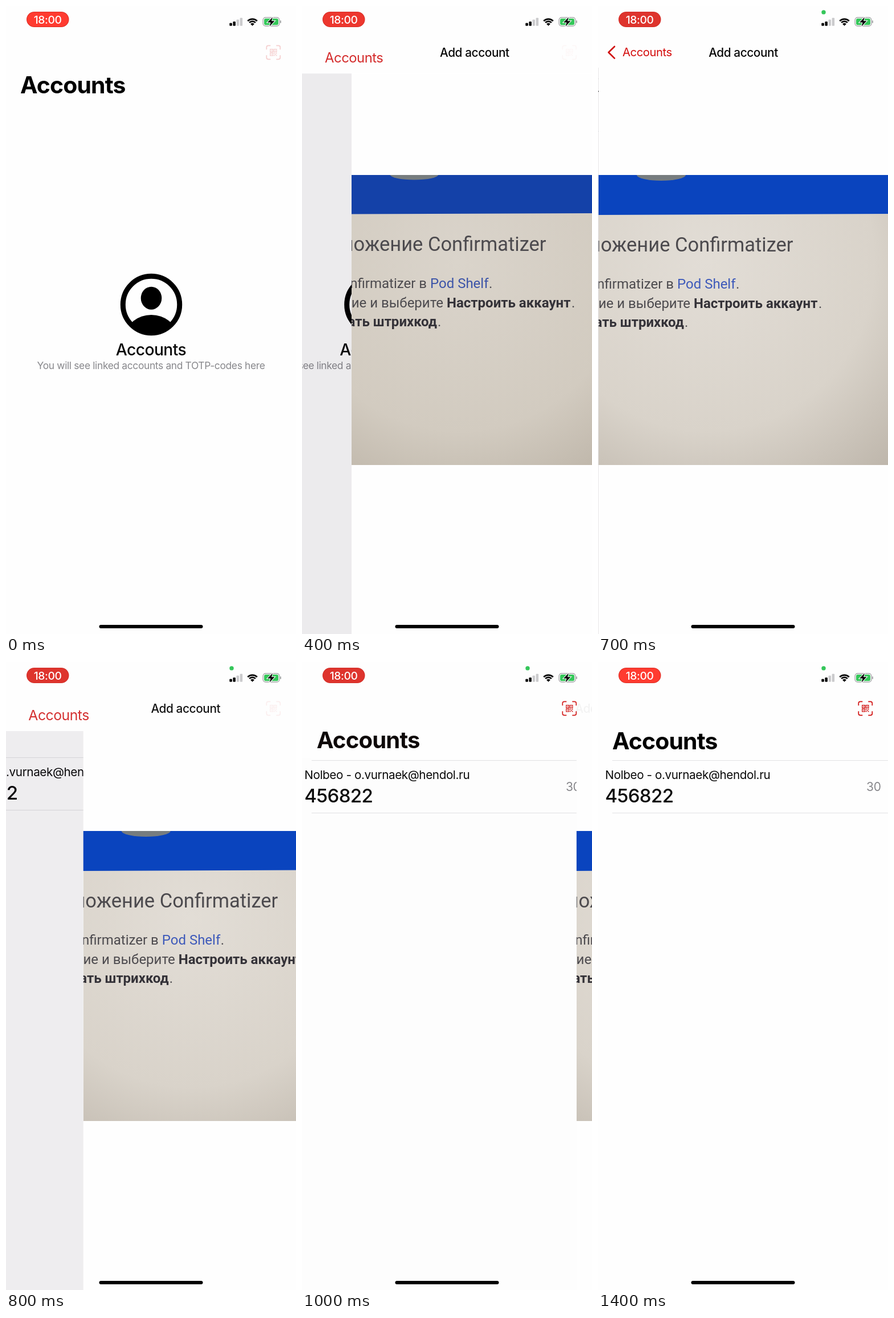
An HTML page with a canvas that plays this animation: 509 px wide and 1100 px high, repeating every 1590 ms.

```html
<!DOCTYPE html>
<html lang="en">
<head>
<meta charset="utf-8">
<title>Accounts</title>
<style>
html, body { margin: 0; height: 100%; overflow: hidden; background: #fefefe; }
canvas { display: block; }
</style>
</head>
<body>
<canvas id="stage" width="509" height="1100"></canvas>
<script>
const W = 509, H = 1100, LOOP = 1590, STEP = 100, LAST = 1400, POP = 700;
const BG = '#fefefe', RED = '#d0100f', GREY = '#88888c';
const UI = 'Inter, "Liberation Sans", sans-serif';
const PHOTO = 'Roboto, "Liberation Sans", sans-serif';
const c = document.getElementById('stage').getContext('2d');

const clamp = v => Math.max(0, Math.min(1, v));
const mix = (a, b, k) => a + (b - a) * k;
const rgb = (a, b, k) => `rgb(${a.map((v, i) => Math.round(mix(v, b[i], k)))})`;
// Critically damped spring from 0 to 1
const spring = a => a <= 0 ? 0 : 1 - (1 + a) * Math.exp(-a);

function ramp(t, keys) {
  const i = keys.findIndex(k => t <= k[0]);
  if (i < 0) return keys[keys.length - 1][1];
  if (!i) return keys[0][1];
  const [t0, a] = keys[i - 1], [t1, b] = keys[i];
  return mix(a, b, (t - t0) / (t1 - t0));
}

function box(x, y, w, h, color, r = 0) {
  c.fillStyle = color;
  c.beginPath();
  c.roundRect(x, y, w, h, r);
  c.fill();
}

function oval(x, y, rx, ry, color) {
  c.fillStyle = color;
  c.beginPath();
  c.ellipse(x, y, rx, ry, 0, 0, 2 * Math.PI);
  c.fill();
}

// y is the middle of the capitals
function text(s, x, y, size, weight, color, align = 'left') {
  c.font = `${weight} ${size}px ${UI}`;
  c.letterSpacing = -0.02 * size + 'px';
  c.textAlign = align;
  c.fillStyle = color;
  c.fillText(s, x, y + size * 0.364);
}

// y is the baseline
function print(s, x, y, size, weight, color, align = 'left') {
  c.font = `${weight} ${size}px ${PHOTO}`;
  c.letterSpacing = '0px';
  c.textAlign = align;
  c.fillStyle = color;
  c.fillText(s, x, y);
}

function emptyPage() {
  c.strokeStyle = '#000';
  c.lineWidth = 9;
  c.beginPath();
  c.arc(255, 523, 49.7, 0, 2 * Math.PI);
  c.stroke();
  oval(255, 511.7, 18.3, 20, '#000');
  c.save();
  c.beginPath();
  c.arc(255, 523, 52, 0, 2 * Math.PI);
  c.clip();
  oval(255, 577, 44, 36, '#000');
  c.restore();
  text('Accounts', 254.5, 602, 28.2, 550, '#0a0a0a', 'center');
  text('You will see linked accounts and TOTP-codes here', 254.5, 629.5, 17.4, 400, GREY, 'center');
}

function listPage(dy) {
  c.save();
  c.translate(0, dy);
  box(25, 172, 700, 1, '#e2e2e4');
  text('Nolbeo - o.vurnaek@hendol.ru', 12.5, 197.5, 20.7, 400, '#0a0a0a');
  text('456822', 12.5, 234, 33, 550, '#0a0a0a');
  text('30', 496.5, 218.5, 21, 400, GREY, 'right');
  box(25, 264, 700, 1, '#e2e2e4');
  c.restore();
}

// dark: 1 while the camera is still adjusting, 0 when settled
function cameraPage(edge, dark) {
  c.save();
  c.translate(edge, 0);
  box(0, 0, W, H, BG);
  c.beginPath();
  c.rect(0, 296, W, 508);
  c.clip();
  const paper = c.createRadialGradient(190, 450, 0, 190, 450, 490);
  paper.addColorStop(0, rgb([226, 221, 214], [207, 199, 186], dark));
  paper.addColorStop(0.6, rgb([217, 211, 202], [200, 191, 177], dark));
  paper.addColorStop(1, rgb([188, 180, 169], [176, 166, 150], dark));
  box(0, 296, W, 508, paper);
  c.translate(0, -3.5 * dark);
  c.filter = 'blur(0.7px)';
  c.fillStyle = rgb([10, 68, 190], [35, 61, 136], dark);
  c.beginPath();
  c.moveTo(-5, 285);
  c.lineTo(W + 5, 285);
  c.lineTo(W + 5, 364);
  c.lineTo(-5, 366);
  c.fill();
  oval(110, 296, 43, 10, '#777d7f');
  const ink = '#4c4a4e', bold = '#343238', link = rgb([62, 90, 186], [56, 74, 140], dark);
  print('Приложение ', 134, 430, 34.5, 400, ink, 'right');
  print('Confirmatizer', 134, 430, 34.5, 400, ink);
  print('Confirmatizer в ', 138, 495, 24, 400, ink, 'right');
  print('Pod Shelf', 138, 495, 24, 400, link);
  print('.', 241, 495, 24, 400, ink);
  print('приложение и выберите ', 167, 529, 24, 400, ink, 'right');
  print('Настроить аккаунт', 167, 529, 24, 700, bold);
  print('.', 386, 529, 24, 400, ink);
  print('Сканировать штрихкод', 150, 562, 24, 700, bold, 'right');
  print('.', 151, 562, 24, 400, ink);
  c.restore();
}

function scanIcon(alpha) {
  c.save();
  c.globalAlpha = alpha;
  c.translate(469.3, 81.3);
  c.strokeStyle = RED;
  c.lineWidth = 1.7;
  for (let i = 0; i < 4; i++) {
    c.beginPath();
    c.moveTo(-12, -5);
    c.lineTo(-12, -9);
    c.quadraticCurveTo(-12, -12, -9, -12);
    c.lineTo(-5, -12);
    c.stroke();
    c.rotate(Math.PI / 2);
  }
  c.lineWidth = 1.2;
  for (const [x, y] of [[-5.6, -5.6], [0.9, -5.6], [-5.6, 0.9]]) {
    c.strokeRect(x, y, 4.7, 4.7);
    box(x + 1.6, y + 1.6, 1.5, 1.5, RED);
  }
  for (const [x, y] of [[0.5, 0.5], [4.3, 0.5], [2.4, 2.4], [0.5, 4.3], [4.3, 4.3]]) box(x, y, 1.8, 1.8, RED);
  c.restore();
}

// q: 0 = large title, 1 = back button
function navBar(q, popping) {
  box(0, 0, W, mix(172, 108, q), BG);
  scanIcon(popping ? (1 - q) ** 1.7 : 0.2 * (1 - q));

  c.globalAlpha = clamp(q * 1.2);
  if (q > 0) text('Add account', mix(551, 255, q), 81, 20.8, 550, '#0a0a0a', 'center');

  const x = mix(117, 17, q), y = mix(138, 81, q);
  c.globalAlpha = clamp((q - 0.85) / 0.15);
  c.strokeStyle = RED;
  c.lineWidth = 2.7;
  c.lineCap = c.lineJoin = 'round';
  c.beginPath();
  c.moveTo(x + 12, y - 10);
  c.lineTo(x + 1.5, y + 0.3);
  c.lineTo(x + 12, y + 10.6);
  c.stroke();
  c.lineCap = 'butt';
  c.lineJoin = 'miter';
  c.globalAlpha = 1;

  const width = mix(184, 87, q), heavy = q < 0.55;
  const tone = 240 * q * (1 - q) + 12 * q;
  text('Accounts', mix(25, 43, q), y, heavy ? width / 4.5 : width / 4.31,
    heavy ? 700 : 400, `rgb(${212 * clamp(q * 1.75)},${tone},${tone})`);
}

function statusBar(t) {
  const pulse = ramp(t, [[200, 0], [300, 0.3], [500, 0.8], [700, 1], [1000, 1], [1400, 0]]);
  box(36, 10, 74.5, 27, rgb([222, 45, 36], [212, 46, 40], pulse), 13.5);
  box(37, 11, 72.5, 25, rgb([255, 59, 48], [222, 52, 45], pulse), 12.5);
  text('18:00', 73.2, 23.7, 19.3, 500, '#fff', 'center');

  const live = t > 500, dot = live ? 3.7 : 2.6;
  if (t >= 500) oval(396, 10.9, dot, dot, live ? '#34c65a' : '#72d68c');
  [5, 7.5, 11, 14].forEach((h, i) => box(392.3 + i * 6.1, 34.7 - h, 4.5, h, i < 2 ? '#000' : '#cbcbcd', 1));

  c.strokeStyle = '#000';
  c.lineWidth = 2.7;
  for (const r of [11.7, 7.6]) {
    c.beginPath();
    c.arc(432.5, 34.5, r, -Math.PI * 0.75, -Math.PI * 0.25);
    c.stroke();
  }
  c.fillStyle = '#000';
  c.beginPath();
  c.moveTo(432.5, 34.8);
  c.arc(432.5, 34.8, 4.7, -Math.PI * 0.75, -Math.PI * 0.25);
  c.fill();

  c.strokeStyle = '#98989b';
  c.lineWidth = 1.2;
  c.beginPath();
  c.roundRect(451.1, 20.1, 28.8, 15, 4.5);
  c.stroke();
  box(453, 22, 25, 11.2, '#34c759', 2.8);
  box(481.2, 25.3, 1.6, 4.8, '#98989b', 1);
  const bolt = new Path2D('M468 19.5 L459 28.8 H464.5 L462.5 35.8 L471.5 26.3 H466 Z');
  c.strokeStyle = '#fff';
  c.lineWidth = 2;
  c.stroke(bolt);
  c.fillStyle = '#000';
  c.fill(bolt);
}

function draw(t) {
  const popping = t >= POP;
  const edge = popping ? Math.max(1, W * spring((t - 745) * 0.0183))
                       : W * (1 - spring((t - 225) * 0.0183));
  const q = popping ? 1 - spring((t - 761) * 0.0214) : spring((t - 247) * 0.0214);

  box(0, 0, W, H, BG);
  c.save();
  c.translate(-0.3 * (W - edge), 0);
  if (popping) listPage(-64 * (1 - spring((t - 665) * 0.031)));
  else emptyPage();
  c.restore();
  box(0, 0, W, H, `rgba(20,0,30,${0.09 * (1 - edge / W)})`);

  if (edge < W) cameraPage(edge, ramp(t, [[300, 1], [400, 0.4], [500, 0]]));
  navBar(q, popping);
  statusBar(t);
  box(163.5, 1084, 182, 6, '#000', 3);
}

function tick() {
  const t = performance.now() % LOOP;
  draw(Math.min(LAST, Math.floor(t / STEP) * STEP));
  requestAnimationFrame(tick);
}
tick();
</script>
</body>
</html>
```
